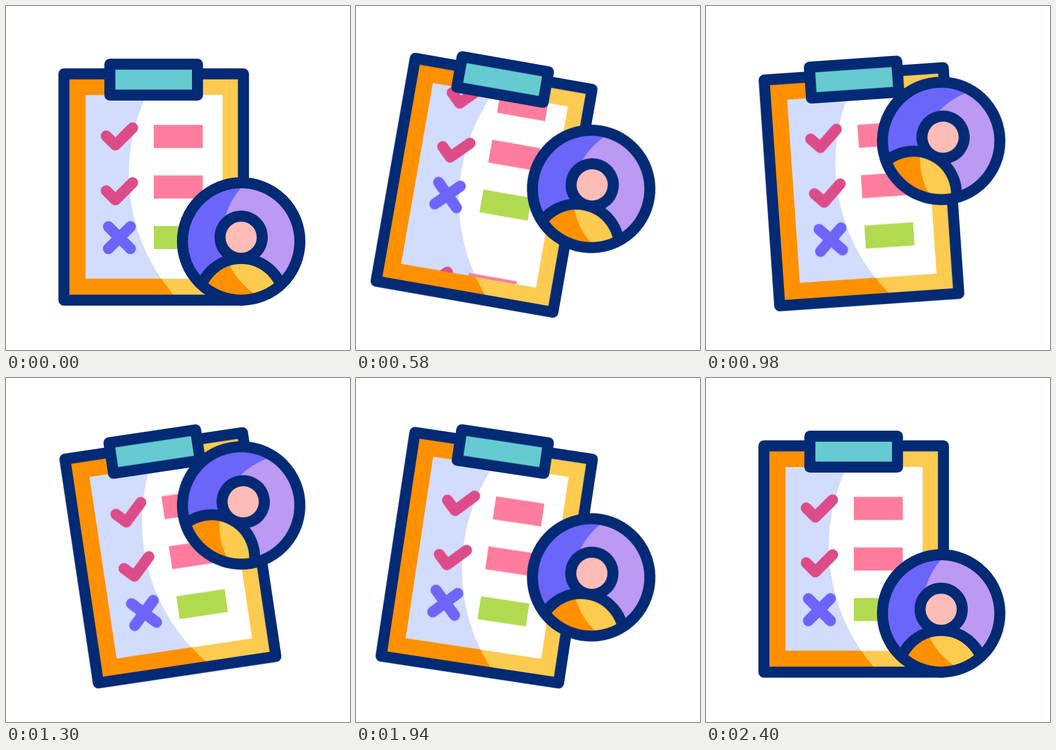
These frames come from a looping animation (640 by 640 pixels, 2.42 s). An HTML page:

```html
<!DOCTYPE html>
<html lang="en">
<head>
<meta charset="utf-8">
<title>Checklist</title>
<style>
  html, body { margin: 0; width: 100%; height: 100%; overflow: hidden; background: #fff; }
  svg { display: block; width: 100%; height: 100%; }
  .line { fill: none; stroke: #032a75; stroke-width: 20.5; stroke-linejoin: round; }
  .mark { fill: none; stroke-width: 20.5; stroke-linecap: round; stroke-linejoin: round; }
  #board { transform-origin: 275px 126px; }
  #face { transform-origin: 437.5px 438px; }
</style>
</head>
<body>
<svg viewBox="0 0 640 640">
  <defs>
    <clipPath id="frameClip"><rect x="107.75" y="126.25" width="334" height="421"/></clipPath>
    <clipPath id="paperClip"><rect x="148" y="165.5" width="255" height="342"/></clipPath>
    <clipPath id="faceClip"><circle cx="437.5" cy="438" r="109"/></clipPath>
    <clipPath id="bodyClip"><circle cx="437.5" cy="549.5" r="79.75"/></clipPath>
    <path id="check" d="M186.5 241.75 203.5 258.75 235.5 226.75"/>
    <g id="items">
      <g class="mark" stroke="#dc4c88">
        <use href="#check"/>
        <use href="#check" y="102"/>
      </g>
      <path class="mark" stroke="#6b65fa" d="M190.5 410.5l41 41M231.5 410.5l-41 41"/>
      <path fill="#fe7d9e" d="M275 221.3h91v43h-91zM275 315.3h91v43h-91z"/>
      <path fill="#b1da51" d="M275 409.2h91v43h-91z"/>
    </g>
  </defs>

  <g id="board">
    <g clip-path="url(#frameClip)">
      <rect x="100" y="120" width="350" height="435" fill="#ff9100"/>
      <circle cx="572.5" cy="313" r="344" fill="#fdcb50"/>
    </g>
    <g clip-path="url(#paperClip)">
      <rect x="148" y="165.5" width="255" height="342" fill="#d2dcfd"/>
      <circle cx="572.5" cy="313" r="344" fill="#fff"/>
      <g id="list">
        <use href="#items"/>
        <use href="#items" y="345.5"/>
      </g>
    </g>
    <rect class="line" x="107.75" y="126.25" width="334" height="421"/>
    <rect class="line" x="193.25" y="108.25" width="163" height="57.5" style="fill:#66cbd0"/>
  </g>

  <g id="badge">
    <g id="face">
      <g clip-path="url(#faceClip)">
        <circle cx="437.5" cy="438" r="109" fill="#6b65fa"/>
        <circle cx="535.7" cy="426" r="132" fill="#bc99f2"/>
        <g clip-path="url(#bodyClip)">
          <rect x="350" y="460" width="180" height="100" fill="#ff9100"/>
          <circle cx="535.7" cy="426" r="132" fill="#fdcb50"/>
        </g>
        <circle class="line" cx="437.5" cy="549.5" r="79.75"/>
        <circle class="line" cx="437.5" cy="430.3" r="39.25" style="fill:#fdbcb6"/>
      </g>
      <circle class="line" cx="437.5" cy="438" r="109.25"/>
    </g>
  </g>
</svg>
<script>
  const LOOP = 2420;
  const EASE = 'cubic-bezier(.33333, 0, .66667, 1)';

  // steps: [time in ms, value]
  function play(id, toTransform, steps) {
    const frames = steps.map(([time, value]) => ({
      offset: time / LOOP, transform: toTransform(value), easing: EASE
    }));
    document.getElementById(id).animate(frames, { duration: LOOP, iterations: Infinity });
  }

  const turn = deg => `rotate(${deg}deg)`;
  const lift = px => `translate(0px, ${-px}px)`;

  play('board', turn, [[0, 0], [600, 10], [1200, -10], [1800, 10], [2400, 0], [LOOP, 0]]);
  play('list', lift, [[0, 0], [440, 0], [950, 345.5], [LOOP, 345.5]]);
  play('badge', lift, [[0, 0], [1200, 205], [2400, 0], [LOOP, 0]]);
  play('face', turn, [[0, 0], [1200, 30], [2400, 0], [LOOP, 0]]);
</script>
</body>
</html>
```
